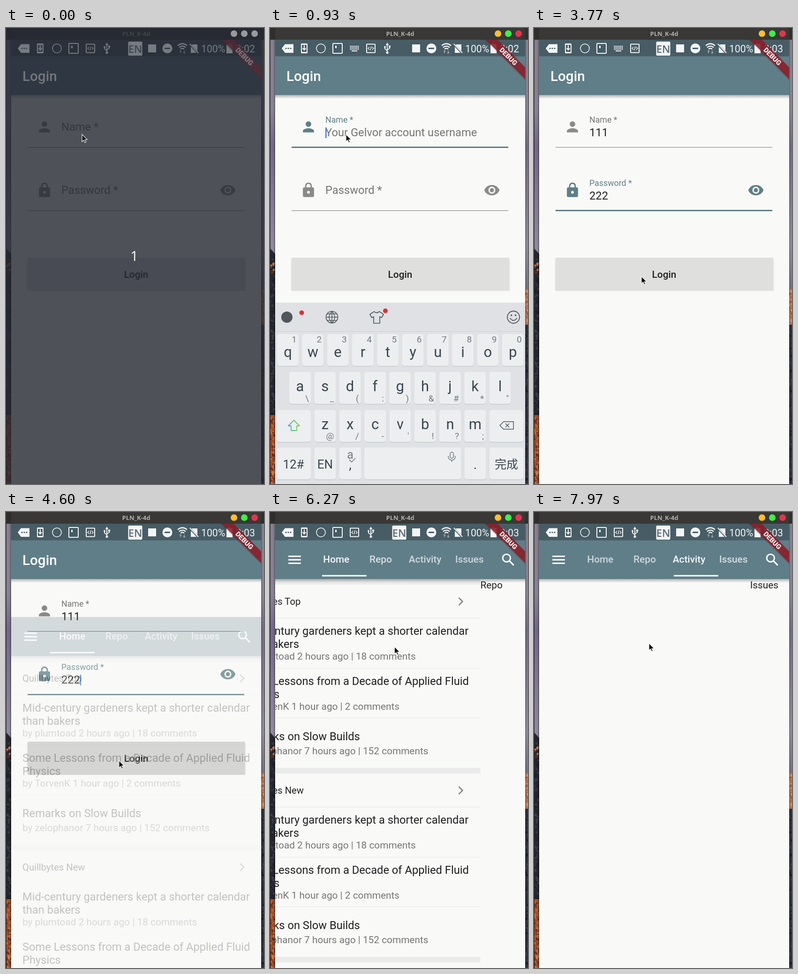
Write an HTML page that moves like this. It is 550 by 973 pixels and loops after 8 s.

```html
<!DOCTYPE html>
<html lang="en">
<head>
<meta charset="utf-8">
<title>Login and tabs</title>
<style>
html, body { margin: 0; width: 100%; height: 100%; overflow: hidden; background: #393836; }
svg { display: block; width: 550px; height: 973px; }
text { font-family: Roboto, sans-serif; white-space: pre; }
</style>
</head>
<body>
<svg id="stage" viewBox="0 0 550 973" xmlns="http://www.w3.org/2000/svg"></svg>
<script>
const LOOP = 8000, PAGE_W = 534;
const TEAL = '#607e88', BAR = '#475c65', PAPER = '#f9faf8', INK = '#1f1f1f', GREY = '#757575';

// Markup helpers
const rect = (x, y, w, h, fill, extra = '') =>
  `<rect x="${x}" y="${y}" width="${w}" height="${h}" fill="${fill}" ${extra}/>`;
const circle = (x, y, r, fill, extra = '') => `<circle cx="${x}" cy="${y}" r="${r}" fill="${fill}" ${extra}/>`;
const text = (x, y, size, fill, str, extra = '') =>
  `<text x="${x}" y="${y}" font-size="${size}" fill="${fill}" ${extra}>${str}</text>`;
const line = (d, stroke, width = 2, extra = '') =>
  `<path d="${d}" fill="none" stroke="${stroke}" stroke-width="${width}" ${extra}/>`;
const shape = (d, fill, extra = '') => `<path d="${d}" fill="${fill}" ${extra}/>`;
const group = (id, body, extra = '') => `<g id="${id}" ${extra}>${body}</g>`;
const stop = (at, color, opacity = 1) => `<stop offset="${at}" stop-color="${color}" stop-opacity="${opacity}"/>`;
const MID = 'text-anchor="middle"', END = 'text-anchor="end"', MEDIUM = 'font-weight="500"';
const SYSTEM = 'style="font-family:Open Sans,sans-serif"';

let seed = 7;
const random = () => (seed = seed * 16807 % 2147483647) / 2147483647;

function speckles(x, w, top, bottom, count, colors) {
  let out = '';
  for (let i = 0; i < count; i++) {
    const px = x + random() * w, py = top + random() * (bottom - top), s = 1 + random() * 3;
    out += shape(`M${px} ${py}l${s} ${s / 2} ${-s / 2} ${s * 1.4} ${-s} ${-s}z`, colors[i % colors.length]);
  }
  return out;
}

function wallpaper() {
  const rock = ['#c0602f', '#7a3822', '#cf7a48', '#5a3024'], stone = ['#343842', '#1b1d24', '#3d404a'];
  return rect(0, 0, 550, 973, 'url(#sky)')
    + shape('M0 470L11 482V973H0z', '#24262e') + speckles(0, 10, 490, 826, 110, stone)
    + speckles(0, 8, 498, 526, 12, rock)
    + rect(0, 826, 11, 147, '#a34d26') + speckles(0, 10, 826, 973, 130, rock)
    + rect(544, 556, 6, 77, '#b8683c') + speckles(544, 5, 556, 633, 40, ['#d09064', '#9c5030', '#d0845a'])
    + rect(544, 633, 6, 340, '#2b303d') + speckles(544, 5, 633, 973, 80, stone)
    + rect(0, 25, 1, 948, '#23232a') + rect(8, 25, 3, 948, '#000', 'opacity=".2"')
    + rect(544, 25, 2, 948, '#000', 'opacity=".2"');
}

const appBar = rect(11, 143, PAGE_W, 8, 'url(#shade)') + rect(11, 60, PAGE_W, 83, TEAL);

const PERSON = 'M12 12c2.2 0 4-1.8 4-4s-1.8-4-4-4-4 1.8-4 4 1.8 4 4 4zm0 2c-2.7 0-8 1.3-8 4v2h16v-2c0-2.7-5.3-4-8-4z';
const EYE = 'M12 4.5C7 4.5 2.7 7.6 1 12c1.7 4.4 6 7.5 11 7.5s9.3-3.1 11-7.5c-1.7-4.4-6-7.5-11-7.5z';
const icon = (x, y, body) => `<g transform="translate(${x} ${y}) scale(1.4826) translate(-12 -12)">${body}</g>`;

function field(id, label, hint, y, icons) {
  return `<clipPath id="${id}Clip">${rect(47, y - 43, 461, 87, '#000')}</clipPath>`
    + `<g clip-path="url(#${id}Clip)">${circle(160, y, 0, '#000', `id="${id}Ink"`)}</g>`
    + group(id + 'Icons', icons)
    + text(118, y + 8, 23.7, GREY, label, `id="${id}Label"`)
    + text(118, y + 20, 23.7, GREY, hint, `id="${id}Hint"`)
    + text(118, y + 20, 23.7, INK, '', `id="${id}Value"`)
    + rect(118, y + 1, 2.6, 23, '#4a82dc', `id="${id}Caret"`)
    + rect(46, y + 43, 462, 1, '#8c8c8c', `id="${id}Line"`);
}

function loginPage() {
  const lock = rect(4, 8, 16, 14, 'currentColor', 'rx="2"') + line('M8 9V6a4 4 0 0 1 8 0V9', 'currentColor')
    + circle(12, 15, 2, PAPER);
  const eye = shape(EYE, 'currentColor') + circle(12, 12, 5, PAPER) + circle(12, 12, 3, 'currentColor');
  return rect(11, 60, PAGE_W, 913, PAPER) + appBar + text(35, 113, 29.6, '#fff', 'Login', MEDIUM)
    + field('name', 'Name *', 'Your Gelvor account username', 211, icon(82, 211, shape(PERSON, 'currentColor')))
    + field('pass', 'Password *', 'Your Gelvor account …', 346, icon(82, 346, lock) + icon(473, 346, eye))
    + rect(44.5, 492, 467, 69, '#000', 'opacity=".07" rx="2"') + rect(46, 490, 463.5, 71, '#dfdfde', 'rx="2"')
    + rect(46, 490, 463.5, 71, '#000', 'id="press" opacity="0" rx="2"')
    + text(277.5, 533, 20.8, INK, 'Login', MID + ' ' + MEDIUM);
}

// Home feed
const STORIES = [
  { y: 262, lines: ['Mid-century gardeners kept a shorter calendar', 'than bakers'], by: 'by plumtoad 2 hours ago | 18 comments' },
  { y: 369, lines: ['Some Lessons from a Decade of Applied Fluid', 'Physics'], by: 'by TorvenK 1 hour ago | 2 comments' },
  { y: 487, lines: ['Remarks on Slow Builds'], by: 'by zelophanor 7 hours ago | 152 comments' }
];

function section(title, dy) {
  const rows = STORIES.map(({ y, lines, by }) =>
    lines.map((s, i) => text(35, y + i * 28, 23.7, INK, s)).join('')
    + text(35, y + (lines.length > 1 ? 53 : 30), 20.8, GREY, by)).join('');
  return `<g transform="translate(0 ${dy})">` + rect(11, 143, PAGE_W, 12, '#ebebeb')
    + text(35, 198, 20.2, INK, title)
    + line('M499 183l8 8-8 8', '#8b8b8b', 2.8)
    + [226, 333, 439].map(y => rect(11, y, PAGE_W, 1, '#e6e7e5')).join('') + rows + '</g>';
}

const TABS = ['Home', 'Repo', 'Activity', 'Issues'];
const tabX = i => 94 + 94.6 * i;

function homePage() {
  const feed = section('Quillbytes Top', 0) + section('Quillbytes New', 403) + rect(11, 949, PAGE_W, 12, '#ebebeb');
  const pages = TABS.map((name, i) =>
    group('page' + i, i ? text(11, 163, 20.8, INK, name) : feed)).join('');
  const labels = TABS.map((name, i) =>
    text(tabX(i) + 47.3, 108, 20.8, '#fff', name, `id="tab${i}" ${MID} ${MEDIUM}`)).join('');
  return rect(11, 60, PAGE_W, 913, PAPER) + pages + appBar
    + icon(52.5, 102, [6, 11, 16].map(y => rect(3, y, 18, 2, '#fff')).join(''))
    + rect(283, 66, 95, 69, '#8a7888', 'id="tabInk" opacity="0"') + labels
    + rect(94, 134.5, 95, 3, '#fff', 'id="indicator"')
    + icon(508, 102, circle(9.5, 9.5, 5.5, 'none', 'stroke="#fff" stroke-width="2"')
      + line('M13.8 13.8l6 6', '#fff', 2.1));
}

// Status bar
function statusBar() {
  const w = '#f4f6f6';
  const code = rect(-9, -9, 18, 18, 'none', `stroke="${w}" stroke-width="2" rx="1"`)
    + line('M-3 -3l-3 3 3 3M3 -3l3 3-3 3M1 -4l-2 8', w, 1.4);
  const usb = line('M0 8V-8M0 5L-5 1V-3M0 3L5 0V-4', w, 1.8) + shape('M0 -12l3.5 5h-7z', w)
    + circle(0, 9, 2.6, w) + circle(-5, -3, 2, w) + rect(3, -6, 4, 4, w);
  let keys = '';
  for (let i = 0; i < 18; i++)
    keys += rect(-9.5 + i % 6 * 3.3, -5 + Math.floor(i / 6) * 3.2, 2.3, 2, w);
  keys += rect(-6, 5, 12, 2, w);
  return shape('M25 43.5L32 34.5H50V53H32z', w) + [34, 39, 44].map(x => circle(x, 43.5, 1.6, BAR)).join('')
    + rect(66, 33, 14, 21, w, 'rx="2"') + rect(68, 36, 10, 15, BAR) + line('M73 37v10M69.5 43l3.5 4 3.5-4', w)
    + circle(108.5, 43.5, 9.5, 'none', `stroke="${w}" stroke-width="1.6"`)
    + rect(134, 33, 20, 21, 'none', `stroke="${w}" stroke-width="2" rx="1"`) + rect(139, 38, 3, 5, w)
    + group('keysIcon', keys, 'transform="translate(180 43)"')
    + group('codeIcon', code) + group('usbIcon', usb)
    + group('lang', rect(260.5, 29, 30, 30, w, 'rx="2"')
      + text(275.5, 52.5, 22, '#5a6a71', 'EN', `${MID} font-weight="600" ${SYSTEM}`))
    + rect(303, 35, 17, 17, w)
    + circle(344, 43.5, 10.5, w) + rect(338, 42, 12, 3, BAR)
    + line('M366 37.5Q376 29.5 386 37.5M369 41.5Q376 36 383 41.5M372 45Q376 42 380 45', w, 2.3)
    + line('M372 54v-6M370 50l2-2 2 2M380 48v6M378 52l2 2 2-2', '#9fabb0', 1.5)
    + shape('M397 35H408V53H394V39z', w) + line('M391 34L410 54', BAR, 4) + line('M392 34L410 53', w, 2)
    + text(416, 51.5, 21.2, w, '100%') + rect(470, 35, 13, 19, w) + rect(474, 33, 5, 3, w)
    + text(490, 51.5, 21.2, w, '', 'id="clock"');
}

const ribbon = `<g clip-path="url(#screen)"><g transform="translate(544 25) rotate(45)">`
  + rect(-70, 41.5, 140, 17.8, '#000', 'opacity=".15" transform="translate(0 2)"')
  + rect(-70, 41.5, 140, 17.8, '#8f1d28', 'opacity=".86"')
  + text(0, 55.6, 14.6, '#f3eeee', 'DEBUG', MID + ' font-weight="900"') + '</g></g>';

// Soft keyboard
function keyboard() {
  const ink = '#39464e', dim = '#727a80', tool = '#50565b', round = 'stroke-linejoin="round"';
  const key = (x, y, w) => rect(x, y + 1.5, w, 68, '#c9ccd0', 'rx="5"') + rect(x, y, w, 68, '#eceef0', 'rx="5"');
  const row = (letters, marks, x0, y, letterY, markY) => [...letters].map((c, i) => {
    const x = x0 + i * 53.3, mark = marks[i] === '&' ? '&amp;' : marks[i];
    return key(x, y, 46) + text(x + 23, y + letterY, 31, ink, c, MID)
      + text(x + 42, y + markY, 19, dim, mark, END);
  }).join('');
  const word = (x, y, size, s) =>
    text(x, y, size, ink, s, MID + ' style="font-family:Roboto,\'Noto Sans CJK SC\',sans-serif"');
  return rect(11, 586, PAGE_W, 387, '#dfe1e4') + rect(11, 647, PAGE_W, 1, '#cdd0d4')
    + circle(36, 617, 12, tool) + circle(67.5, 607.5, 5, '#dc2f38')
    + circle(132, 617, 12.5, 'none', `stroke="${tool}" stroke-width="1.6"`)
    + line('M119.5 617h25M132 604.5v25M122 610h20M122 624h20M132 604.5q-12 12.5 0 25q12-12.5 0-25', tool, 1.4)
    + line('M222 605q5 5 11 0l9 6-4 7-4-2v14h-13v-14l-4 2-4-7z', tool, 1.7, round) + circle(246, 603.5, 5, '#dc2f38')
    + circle(519, 617, 13, 'none', `stroke="${tool}" stroke-width="1.8"`)
    + circle(514.5, 613, 1.8, tool) + circle(523.5, 613, 1.8, tool) + line('M511.5 619q7.5 10 15 0', tool, 1.8)
    + row('qwertyuiop', '1234567890', 15, 653, 49, 18)
    + row('asdfghjkl', '\\_(:)&#*"', 41, 734, 41, 63)
    + row('zxcvbnm', "@/-'!?;", 94.5, 815, 41, 62)
    + key(15, 815, 72) + line('M51 837l12 12h-6v10h-12v-10h-6z', 'url(#shift)', 1.8, round)
    + key(468, 815, 72) + line('M490 848l8-8h21v16h-21zM502 844l8 8M510 844l-8 8', tool, 1.5)
    + key(15, 895, 72) + word(50, 940, 26, '12#') + key(94.5, 895, 46) + word(117.5, 940, 26, 'EN')
    + key(148, 895, 46) + text(171, 919, 25, dim, 'a', MID) + line('M169 921l5 5 8-8', dim, 1.6) + word(171, 941, 28, ',')
    + key(201, 895, 206) + rect(384, 905, 7, 13, 'none', `rx="3.5" stroke="${dim}" stroke-width="1.5"`)
    + line('M380 913q0 9 7.5 9t7.5-9M387.5 922v4', dim, 1.5)
    + key(414.5, 895, 46) + word(437.5, 941, 28, '.') + key(468, 895, 72) + word(504, 940, 25, '完成');
}

document.getElementById('stage').innerHTML = `<defs>
  <linearGradient id="sky" x2="0" y2="1">${stop(0, '#85808c')}${stop(.18, '#8a8396')}${stop(.26, '#74688a')}${stop(.48, '#9089a0')}${stop(.57, '#75708a')}</linearGradient>
  <linearGradient id="shade" x2="0" y2="1">${stop(0, '#000', .28)}${stop(1, '#000', 0)}</linearGradient>
  <linearGradient id="shift" x2="1" y2="0">${stop(0, '#5a9dd0')}${stop(.4, '#4cc08a')}${stop(1, '#8ccf4a')}</linearGradient>
  <clipPath id="screen">${rect(11, 25, PAGE_W - 1, 948, '#000')}</clipPath></defs>`
  + wallpaper()
  + rect(0, 0, 550, 25, '#2f2e2d') + rect(11, 0, 533, 25, '#393836', 'rx="3"')
  + text(277.5, 17, 13, '#b3b0aa', 'PLN_K-4d', `${MID} font-weight="700" ${SYSTEM}`)
  + `<g clip-path="url(#screen)">${group('login', loginPage())}${group('home', homePage())}${group('keyboard', keyboard())}`
  + rect(11, 25, PAGE_W, 35.5, BAR) + '</g>'
  + group('dimmer', rect(0, 0, 550, 973, '#232731', 'opacity=".8"')
    + text(35, 113, 29.6, '#fff', 'Login', MEDIUM + ' opacity=".2"')
    + text(273.5, 497, 29, '#fff', '1', `${MID} ${SYSTEM}`))
  + group('bright', statusBar() + ribbon)
  + [486, 508, 530].map((x, i) => circle(x, 12, 7, '#b9bbbd', `id="button${i}"`)).join('')
  + shape('M0 0V15.5L3.6 12.2 6 17.6 8.6 16.5 6.2 11.2H11z', '#0b0b0b',
    'id="pointer" stroke="#fff" stroke-width="1.1"');

const el = {};
document.querySelectorAll('svg [id]').forEach(node => el[node.id] = node);
const set = (id, attrs) => { for (const k in attrs) el[id].setAttribute(k, attrs[k]); };
const show = (id, on) => set(id, { display: on ? 'inline' : 'none' });

// Easing and key tables: each step is [time, values...]
const clamp = u => Math.max(0, Math.min(1, u));
const smooth = u => u * u * (3 - 2 * u);
const easeOut = u => 1 - (1 - u) * (1 - u);
const ramp = (t, from, to) => clamp((t - from) / (to - from));

function track(steps, t, ease) {
  const i = steps.findIndex(s => s[0] > t);
  if (i === 0) return steps[0].slice(1);
  if (i < 0) return steps[steps.length - 1].slice(1);
  const a = steps[i - 1], b = steps[i], u = ease(ramp(t, a[0], b[0]));
  return a.slice(1).map((v, k) => v + (b[k + 1] - v) * u);
}

const POINTER = [
  [0, 162, 227], [1950, 162, 227], [2260, 157, 342], [3500, 157, 342], [3770, 229, 530], [3860, 229, 530],
  [4040, 233, 556], [4270, 240, 540], [4520, 240, 540], [5200, 262, 296], [5360, 217, 147], [5430, 217, 147],
  [5950, 330, 290], [6120, 330, 290], [6420, 202, 285], [6880, 202, 285], [7080, 321, 111], [7250, 321, 111],
  [7640, 329, 283], [7720, 329, 283], [7970, 245, 280]
];
const PAGES = [[6120, 0], [6420, .24], [6750, 1], [6984, 1], [7284, 2], [7720, 2], [7970, 2.158]];
const MARKER = [[6120, 0], [6420, .24], [6750, 1], [6950, 1], [7120, 2], [7720, 2], [7970, 2.158]];

function drawField(id, y, t, focusAt, blurAt, char, keyTimes) {
  const focused = t >= focusAt && t < blurAt, color = focused ? TEAL : '#8a8a8a';
  const typed = keyTimes.filter(k => t >= k), since = t - Math.max(focusAt, ...typed);
  const lift = 1 - Math.pow(1 - ramp(t, focusAt, focusAt + 185), 1.75);
  const age = t - focusAt;
  set(id + 'Icons', { color });
  set(id + 'Label', { y: y + 8 - 17 * lift, 'font-size': 23.7 - 5.9 * lift, fill: focused ? TEAL : GREY });
  show(id + 'Hint', focused && !typed.length);
  el[id + 'Value'].textContent = char.repeat(typed.length);
  show(id + 'Caret', focused && since % 1000 < 500);
  set(id + 'Caret', { x: 118 + 13.2 * typed.length });
  set(id + 'Line', { y: y + (focused ? 42 : 43), height: focused ? 3 : 1.2, fill: color });
  set(id + 'Ink', { r: age > 0 ? Math.min(400, age * 2.2) : 0, opacity: .022 * (1 - ramp(age, 110, 175)) });
}

function draw(t) {
  const intro = t < 30, focusedWindow = t >= 370;
  show('dimmer', intro);
  set('bright', { opacity: intro ? .38 : 1 });
  ['#fbc02d', '#3df04a', '#e0364c'].forEach((c, i) =>
    set('button' + i, { fill: focusedWindow ? c : intro ? '#989a9e' : '#b9bbbd' }));

  const keys = t >= 690 && t < 4500, lang = t < 690 || t >= 1330;
  show('keysIcon', keys);
  show('lang', lang);
  show('usbIcon', !keys || !lang);
  set('codeIcon', { transform: `translate(${keys ? 215 : 180} 43.5)` });
  set('usbIcon', { transform: `translate(${keys ? 250 : 215} 43.5)` });
  el.clock.textContent = t < 1800 ? '3:02' : '3:03';

  drawField('name', 211, t, 600, 2300, '1', [1530, 1700, 1870]);
  drawField('pass', 346, t, 2300, LOOP, '2', [2650, 2950, 3250]);
  set('press', { opacity: .1 * ramp(t, 4370, 4480) });

  const board = smooth(ramp(t, 690, 900)) - smooth(ramp(t, 1180, 1380));
  show('keyboard', board > 0);
  set('keyboard', { transform: `translate(0 ${387 * (1 - board)})` });

  const enter = easeOut(ramp(t, 4560, 4860));
  show('home', enter > 0);
  set('home', { opacity: enter, transform: `translate(0 ${220 * (1 - enter)})` });
  const page = track(PAGES, t, easeOut)[0], marker = track(MARKER, t, easeOut)[0];
  TABS.forEach((_, i) => {
    set('page' + i, { transform: `translate(${(i - page) * PAGE_W} 0)` });
    set('tab' + i, { opacity: .7 + .3 * clamp(1 - Math.abs(marker - i)) });
  });
  set('indicator', { x: tabX(marker) - .2 });
  set('tabInk', { opacity: .4 * (ramp(t, 6980, 7110) - ramp(t, 7230, 7450)) });

  const [x, y] = track(POINTER, t, smooth);
  set('pointer', { transform: `translate(${x} ${y})` });
}

const start = performance.now();
function tick() {
  draw((performance.now() - start) % LOOP);
  requestAnimationFrame(tick);
}
tick();
</script>
</body>
</html>
```
